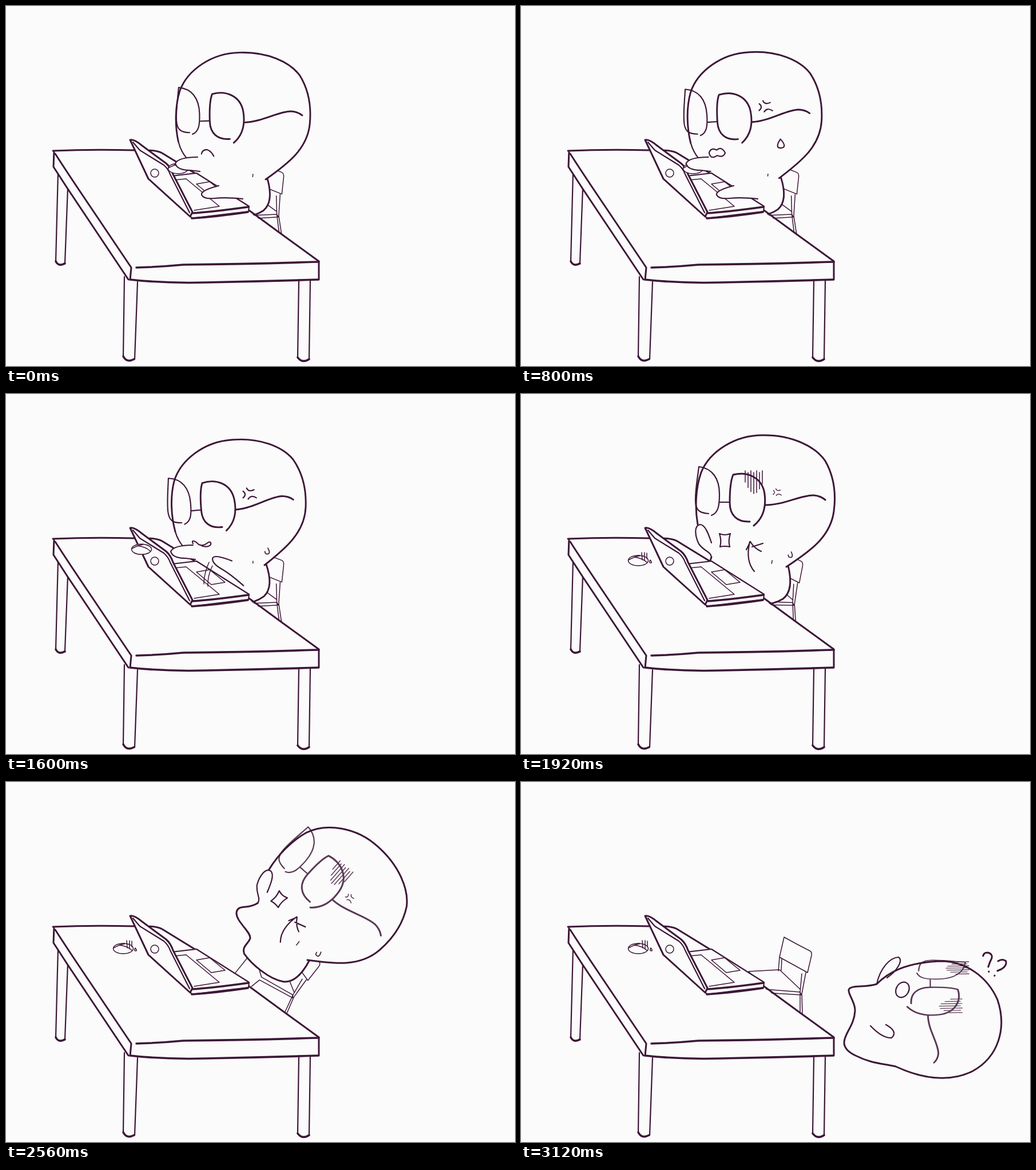
An HTML page for the animation above (3200 ms loop, 890 px wide and 629 px high).

```html
<!DOCTYPE html>
<html lang="en">
<head>
<meta charset="utf-8">
<title>Desk mishap</title>
<style>
html,body{margin:0;width:100%;height:100%;overflow:hidden;background:#fbfbfb}
svg{display:block;width:100vw;height:100vh}
path,ellipse,circle{fill:none;stroke:#3d1737;stroke-width:3;stroke-linecap:round;stroke-linejoin:round}
.paper{fill:#fbfbfb}
.blank{fill:#fbfbfb;stroke:none}
.mid{stroke-width:2.2}
.thin{stroke-width:1.5}
.bold{stroke-width:3.6}
</style>
</head>
<body>
<svg viewBox="0 0 890 629">
  <!-- drawn around its top right corner -->
  <g id="chair">
    <path class="paper thin" d="M-48-27Q-25-14-3-3Q1-1 0 5L-7 35L-56 8Z"/>
    <path class="thin" d="M-56 8L-58 32M-52 11L-53 31M-110 33L-56 30L-20 64M-117 33L-128 78M-110 33L-83 64L-20 69L-18 74L-84 70L-92 86M-10 35L-17 72L-16 107M-17 37L-20 69L-20 107"/>
  </g>

  <!-- one rigid figure that pivots on its neck -->
  <g id="figure">
    <path class="paper" d="M333 285C328 305 310 308 315 320C322 335 358 330 364 340C368 350 362 360 374 367C395 372 435 372 458 358C475 345 472 320 467 300"/>
    <path class="paper" d="M309 228C304 200 305 165 315 137C330 100 375 71 425 72C475 72 515 92 532 117C548 145 551 175 547 205C541 250 505 275 464 302"/>
    <path id="chin" class="mid" d="M309 228C313 248 322 260 334 270"/>
    <g id="slip"><g id="glasses">
      <path class="mid" d="M328 209C312 208 305 203 305 185C305 165 309 145 311 127C335 130 347 148 347 175C347 195 345 208 333 212M347 189H365"/>
      <path d="M400 223C378 224 365 212 365 190C365 170 367 150 371 141C395 135 422 145 426 175C429 200 422 218 407 230M428 194C460 194 490 176 512 177Q524 178 532 185"/>
      <path id="hatch" class="thin"/>
    </g></g>
    <path id="mouth" class="mid"/>
    <path id="anger" class="mid" d="M-11-6q7 6-1 12M-4-11q3 8 13 4M-3 9q6-8 15-1"/>
    <path id="sweat" class="mid"/>
    <path id="raisedR" class="mid" d="M408 310C395 295 396 275 400 258M394 272L401 258Q408 270 420 275M404 267L423 261"/>
    <path id="raisedL" class="paper mid" d="M333 260C328 245 322 228 313 228C302 230 304 248 311 262C320 275 332 275 333 285"/>
  </g>

  <g>
    <path class="paper mid" d="M91 291L87 446Q91 456 103 449L108 318M207 473L205 612Q211 624 225 617L230 482M512 481L510 614Q518 626 530 617L532 480"/>
    <path class="bold" d="M87 446Q92 456 103 450M205 612Q211 624 224 617M510 614Q518 625 530 617"/>
    <path class="blank" d="M84 253L265 253L330 293L547 446L547 478L216 478L83 282Z"/>
    <path d="M82 253Q150 250 224 252M245 252Q263 252 273 257L330 292M425 357L485 401L547 446M84 253L83 281L107 318L214 478M86 258Q105 288 151 356L219 457L217 478M547 446V478"/>
    <path class="bold" d="M228 457Q268 456 310 452Q420 451 547 447M217 478Q280 485 350 483Q450 481 546 478"/>
  </g>
  <g>
    <path class="paper mid" d="M290 297L333 292L425 350L424 359Q380 364 325 371L320 363Z"/>
    <path class="bold" d="M325 371Q370 368 423 360M324 362Q360 360 424 351"/>
    <path class="thin" d="M294 304L315 302L373 350L329 357M333 311L356 307L383 329L359 333Z"/>
    <path class="paper" d="M217 234Q224 232 238 244L280 275Q288 282 292 294L326 360L322 368L249 302Z"/>
    <path class="mid" d="M222 238L234 252L276 278Q284 285 287 294L321 361"/>
    <circle class="thin" cx="260" cy="292" r="7"/>
  </g>

  <g id="mouse">
    <ellipse class="paper thin" rx="17.5" ry="9"/>
    <path class="thin" d="M-17-1Q-6-7 2-8M-7-6Q8-4 15 3M-7-6L2-9"/>
    <path id="shake" class="thin" d="M6-14L7-1M11-14V0M15-13V-3M21-1q4 5 1 5q-4 0-1-5"/>
  </g>
  <g id="typing">
    <path id="handL" class="paper mid" d="M333 264Q300 264 294 275Q297 287 320 287L337 289"/>
    <path id="handR" class="paper mid" d="M372 314Q340 322 342 330Q346 338 365 336T414 337"/>
    <path id="tapLines" class="thin" d="M355 294q-9 20-9 38M361 300q-9 18-8 36"/>
  </g>

  <g id="fallen">
    <path class="paper" d="M622 353C640 335 670 314 740 313C780 316 815 340 833 380C850 430 835 480 790 505C750 525 705 520 655 497C635 492 612 492 585 478C572 472 565 465 565 455C565 440 583 425 584 400C585 385 572 372 573 363C576 354 600 360 622 353"/>
    <path class="mid" d="M622 353C628 325 645 307 660 306C670 312 655 332 640 342M611 426Q632 448 648 447Q660 436 638 424"/>
    <ellipse class="mid" cx="667" cy="363" rx="11" ry="14" transform="rotate(30 667 363)"/>
    <use href="#glasses" transform="translate(777 315) rotate(89) scale(.79 1) translate(-311 -127)"/>
    <use href="#hatch" transform="translate(762 325) rotate(89) scale(.7 1) translate(-407 -155)"/>
  </g>
  <path id="questions" d="M808 304q1-6 8-6q9 2 7 10q-4 8-6 15M818 331v.5M834 313q8-5 14 0q2 8-8 14l-7 3M828 338v.5"/>
</svg>
<script>
const LOOP = 3200, STEP = 80;
const ANGRY = 640, HAMMER = 1040, STARTLED = 1680, TIPPED = 2560, LANDED = 2880;
const NECK = '-464 -302';

// time, neck x, neck y, angle, size, glasses offset
const figureKeys = [
  [320, 454, 303, -2, .97, 2],
  [ANGRY, 451, 302, -3, .97, -5],
  [HAMMER, 452, 299, -5, .97, -6],
  [STARTLED, 452, 299, -5, .97, -6],
  [1920, 464, 302, 0, 1, 0],
  [2240, 474, 300, 6, 1, 0],
  [TIPPED, 527, 311, 41.5, 1, 0],
  [LANDED, 602, 494, 100, 1, 0]
];
// time, corner x, corner y, angle
const chairKeys = [
  [STARTLED, 485, 293, -7],
  [2240, 502, 297, 4],
  [TIPPED, 549, 318, 25],
  [LANDED, 508, 298, 0]
];
const mouths = {
  frown: 'M350 252Q352 244 361 245Q368 248 372 257',
  wavy: 'M341 248Q345 238 355 244Q364 237 370 250Q366 259 355 254Q343 261 341 248Z',
  flat: 'M339 252Q336 244 345 250Q352 260 362 255Q372 248 371 256Q368 262 355 258',
  gasp: 'M347 244Q356 248 366 244Q362 256 365 267Q356 265 348 267Q351 256 347 244Z'
};
const drops = {
  full: 'M0-8C8 2 8 8 0 8S-8 2 0-8Z',
  open: 'M2-7q6 13-2 13q-5 0-5-6'
};

const $ = id => document.getElementById(id);
const clamp = u => Math.max(0, Math.min(1, u));
const show = (id, on) => $(id).style.display = on ? '' : 'none';
const transform = (id, value) => $(id).setAttribute('transform', value);
const shape = (id, d) => $(id).setAttribute('d', d);

function track(keys, t) {
  const next = keys.findIndex(k => t < k[0]);
  if (next === 0) return keys[0].slice(1);
  if (next < 0) return keys.at(-1).slice(1);
  const a = keys[next - 1], b = keys[next];
  const u = (t - a[0]) / (b[0] - a[0]);
  return a.map((v, i) => v + (b[i] - v) * u).slice(1);
}

// Falling speeds up after the tipping point.
function fallTime(t) {
  const span = LANDED - TIPPED;
  return t < TIPPED ? t : TIPPED + span * ((t - TIPPED) / span) ** 2;
}

let strokes = '';
for (let i = 0; i < 7; i++) {
  const x = 392 + 5 * i;
  strokes += `M${x} ${134 + 3 * (i % 2)}V${154 + 20 * Math.sin(i / 2)}`;
}
shape('hatch', strokes);

function draw(t) {
  const beat = (t / STEP) % 2;
  const typing = t < STARTLED, landed = t >= LANDED;
  const [x, y, angle, size, slip] = track(figureKeys, fallTime(t));
  const bob = typing ? 3 * beat : 0;

  transform('figure', `translate(${x} ${y - bob}) rotate(${angle}) scale(${size}) translate(${NECK})`);
  const [cx, cy, lean] = track(chairKeys, fallTime(t));
  transform('chair', `translate(${cx} ${cy}) rotate(${lean})`);
  transform('slip', `translate(${slip} ${typing ? 4 : 0})`);
  $('glasses').style.opacity = t > 2240 ? .85 : 1;

  show('figure', !landed);
  show('fallen', landed);
  const settle = clamp((t - LANDED) / 160);
  transform('fallen', `translate(0 ${14 * (1 - settle)})`);
  show('questions', t >= 2960);

  shape('mouth', mouths[t < 480 ? 'frown' : t < HAMMER ? 'wavy' : typing ? 'flat' : 'gasp']);
  show('chin', typing);
  show('typing', typing);
  show('raisedL', !typing);
  show('raisedR', !typing);
  show('hatch', t >= 1760);

  show('anger', t >= ANGRY);
  transform('anger', `translate(448 172) scale(${typing ? 1 : .6})`);
  const slide = clamp((t - 800) / 1120);
  show('sweat', t >= ANGRY);
  shape('sweat', drops[t < HAMMER ? 'full' : 'open']);
  transform('sweat', `translate(471 ${281 - 41 * (1 - slide) ** 2}) scale(${1 - .25 * slide})`);

  const hammering = t >= HAMMER;
  const lift = hammering ? 36 * (1 - beat) : 12 * beat;
  transform('handL', `translate(${slip} ${-3 * beat})`);
  transform('handR', `rotate(${lift} 418 338)`);
  show('tapLines', hammering && !beat);

  const toss = clamp((t - 1440) / 240);
  transform('mouse', `translate(${301 - 96 * toss} ${284 + 7 * toss - 20 * Math.sin(Math.PI * toss)})`);
  show('shake', !typing);
  transform('shake', `translate(${beat} 0)`);
}

function tick(now) {
  draw(Math.floor((now % LOOP) / STEP) * STEP);
  requestAnimationFrame(tick);
}
draw(0);
requestAnimationFrame(tick);
</script>
</body>
</html>
```
